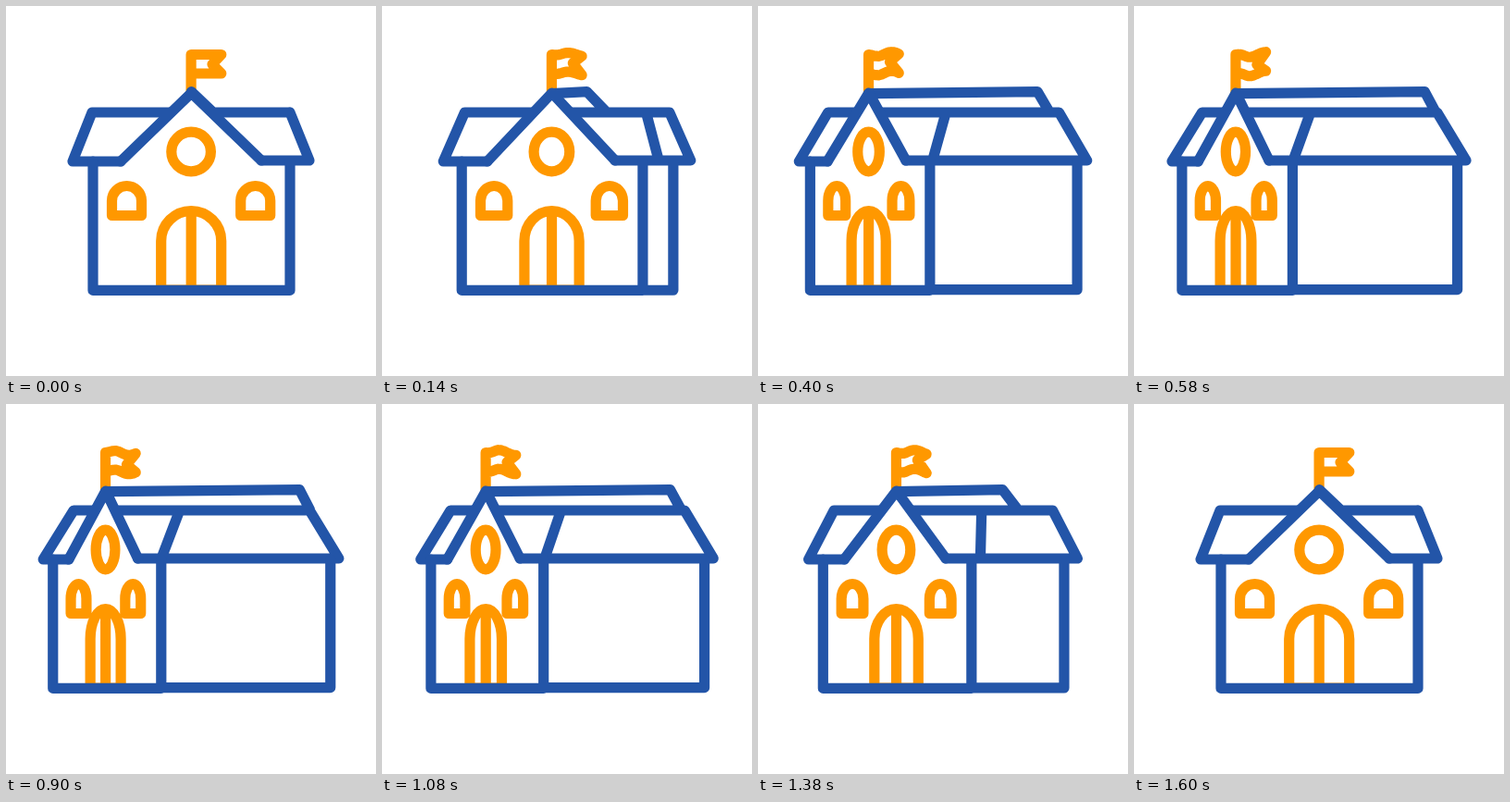
These frames come from a looping animation (400 px wide and 400 px high, 2770 ms). An HTML page:

```html
<!DOCTYPE html>
<html lang="en">
<head>
<meta charset="utf-8">
<title>School</title>
<style>
html, body { margin: 0; height: 100%; overflow: hidden; background: #fff; }
svg { display: block; width: 100%; height: 100%; }
path { fill: none; stroke-width: 11.2; stroke-linecap: round; stroke-linejoin: round; }
.orange { stroke: #ff9800; }
.blue { stroke: #2355a8; }
#gable { fill: #fff; stroke: none; }
</style>
</head>
<body>
<svg viewBox="0 0 400 400">
  <path id="flag" class="orange"/>
  <path id="roof" class="blue"/>
  <path id="gable"/>
  <path id="details" class="orange"/>
  <path id="front" class="blue"/>
</svg>
<script>
const LOOP = 2770, TURN = 800, STEP = 20;
const $ = id => document.getElementById(id);
const clamp = v => Math.max(0, Math.min(1, v));
const bezier = (s, a, b) => 3 * s * (1 - s) ** 2 * a + 3 * s * s * (1 - s) * b + s ** 3;

// cubic-bezier(.36, 0, 0, 1)
function ease(u) {
  let lo = 0, hi = 1;
  for (let i = 0; i < 24; i++) {
    const mid = (lo + hi) / 2;
    if (bezier(mid, .36, 0) < u) lo = mid; else hi = mid;
  }
  return bezier(lo, 0, 1);
}

// [time, crest position along the flag]
const crests = [[0, .5], [260, .58], [580, 1], [900, 1.33], [1220, 1.68], [1600, 1.75]];
function crestAt(t) {
  const i = crests.findIndex(k => k[0] > t);
  if (i < 0) return 1.75;
  const [t0, a] = crests[i - 1], [t1, b] = crests[i];
  return a + (b - a) * (t - t0) / (t1 - t0);
}

function flagPath(x, t) {
  const amp = 2.8 * clamp(Math.min(t, 2 * TURN - t) / 200), crest = crestAt(t);
  const point = (s, y) => {
    const wave = amp * Math.min(1, 2.5 * s) * Math.cos(2 * Math.PI * (s - crest) / 1.1);
    return `${x + 32.7 * s} ${y - wave}`;
  };
  const edge = [...Array(13).keys()].map(i => i / 12);
  const points = [...edge.map(s => point(s, 52.5)), point(.7, 63),
    ...edge.reverse().map(s => point(s, 73))];
  return `M${x} 94L${points.join('L')}`;
}

const arch = (x, rx, ry, top, bottom) =>
  `M${x - rx} ${bottom}V${top + ry}A${rx} ${ry} 0 0 1 ${x + rx} ${top + ry}V${bottom}Z`;

function draw(t) {
  const p = t < 2 * TURN ? ease(1 - Math.abs(t - TURN) / TURN) : 0;
  const mix = (a, b) => a + (b - a) * p;

  const apex = mix(200.4, 107.3), left = mix(94, 50.5);
  const corner = mix(307, 167), right = mix(307, 351);
  const gableL = mix(124, 67.5), gableR = mix(276, 141.8);
  const ring = mix(21.3, 10.3), win = mix(16, 8.4);
  const gable = `M${gableL} 168L${apex} 94L${gableR} 167`;

  $('flag').setAttribute('d', flagPath(apex - .3, t));
  $('roof').setAttribute('d',
    `M${apex} 94.6L${mix(200.4, 318)} 92.7L${mix(223, 329)} 114` +
    `M${gableL} 168H${mix(72, 40)}L${mix(93, 73)} 115H${mix(307, 328.3)}` +
    `L${mix(328, 360)} 167H${gableR}` +
    `M${mix(307, 187)} 115L${mix(328, 167)} 167`);
  $('gable').setAttribute('d', gable + 'Z');
  $('details').setAttribute('d',
    `M${apex - ring - .3} 157.5a${ring} 21.3 0 0 1 ${2 * ring} 0a${ring} 21.3 0 0 1 ${-2 * ring} 0Z` +
    arch(mix(130.5, 78.2), win, 16, 194.5, 226.5) +
    arch(mix(269.7, 136.5), win, 16, 194.5, 226.5) +
    arch(apex - .2, mix(32.5, 16.4), 32.5, 221.5, 307) +
    `M${apex - .2} 221.5V307`);
  $('front').setAttribute('d',
    gable + `M${left} 168V307.4H${corner}V168M${corner} ${mix(307.4, 306.6)}H${right}V168`);
}

const start = performance.now();
function tick() {
  const t = (performance.now() - start) % LOOP;
  draw(Math.floor(t / STEP) * STEP);
  requestAnimationFrame(tick);
}
tick();
</script>
</body>
</html>
```
